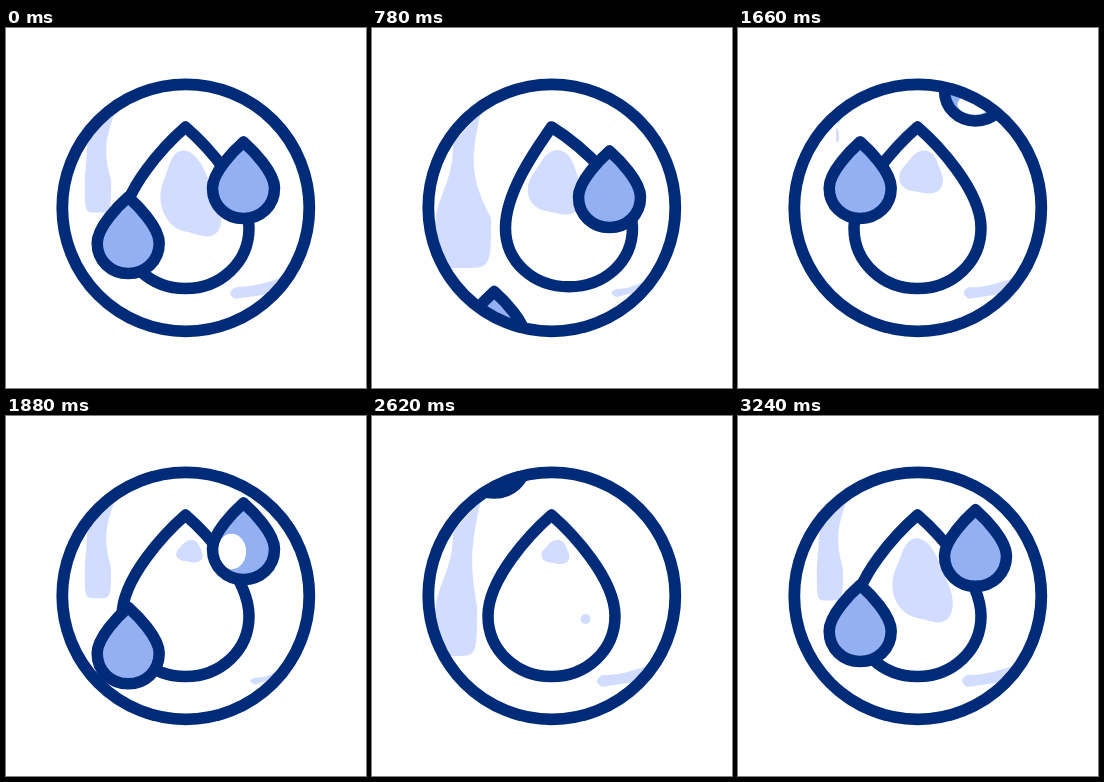
Write an HTML page that moves like this. It is 360x360 px and loops after 3.26 s.

```html
<!DOCTYPE html>
<html lang="en">
<head>
<meta charset="utf-8">
<title>Falling drops</title>
<style>
  html, body { margin: 0; width: 100%; height: 100%; overflow: hidden; background: #fff; }
  svg { display: block; width: 100%; height: 100%; }
  .line { fill: none; stroke: #002b79; stroke-width: 11.5; stroke-linejoin: round; }
  .tint { fill: #d1dcfe; }
  .water { fill: #93b1f2; }
</style>
</head>
<body>
<svg viewBox="0 0 360 360">
  <defs>
    <path id="drop" d="M0 6C-9 14-31 36-31 52C-31 70-17 82.5 0 82.5S31 70 31 52C31 36 9 14 0 6Z"/>
    <clipPath id="inside"><circle cx="179.8" cy="179.8" r="124"/></clipPath>
    <clipPath id="dropShape"><use href="#drop"/></clipPath>
  </defs>
  <g clip-path="url(#inside)">
    <path id="stream" class="tint"/>
    <path id="puddle" class="tint"/>
    <path id="core" class="tint"/>
    <circle id="dot" class="tint" cx="213.5" cy="203"/>
    <path id="bigDrop" class="line"/>
    <g id="leftDrop">
      <use href="#drop" class="water"/>
      <use href="#drop" class="line"/>
    </g>
    <g id="rightDrop">
      <use href="#drop" class="water"/>
      <g clip-path="url(#dropShape)"><ellipse id="glint" fill="#fff"/></g>
      <use href="#drop" class="line"/>
    </g>
  </g>
  <circle class="line" cx="179.8" cy="179.8" r="123.5" style="stroke-width: 11.8"/>
</svg>
<script>
const LOOP = 3260, HOLD = 260, STEP = 20;
const clamp01 = x => Math.min(1, Math.max(0, x));
const mix = (a, b, k) => a + (b - a) * k;
const easeOut = x => 1 - (1 - x) ** 3;
const bump = (t, center, width) => Math.exp(-(((t - center) / width) ** 2));

function set(id, attributes) {
  const node = document.getElementById(id);
  for (const name in attributes) node.setAttribute(name, attributes[name]);
}

// Value at time t along [time, value] keys
function track(t, keys, ease = x => x) {
  const next = Math.max(1, keys.findIndex(([time]) => time >= t));
  const [[t0, v0], [t1, v1]] = [keys[next - 1], keys[next]];
  return mix(v0, v1, ease(clamp01((t - t0) / (t1 - t0))));
}

const reachKeys = [[0, .56], [520, 1], [1020, 1], [1400, 0], [2360, 1], [3000, .56]];
const coreKeys = [[0, 1], [520, .75], [1020, .3], [1400, .5], [1860, 0], [2360, .28], [3000, 1]];

// Tint running down the left wall
function stream(reach, bulge) {
  const top = 84, low = 114 + 126 * reach, h = low - top;
  const open = clamp01(reach * 4);
  const left = mix(98, 79, open) - 16 * reach ** 8;
  const right = mix(101, 105, open) + 14 * bulge;
  return `M109 ${top}C98 ${top + .3 * h} 98 ${top + .42 * h} ${right} ${top + .68 * h}` +
    `C${right} ${low} ${right} ${low} ${(left + right) / 2} ${low}` +
    `C${left} ${low} ${left} ${low} ${left} ${low - .26 * h}` +
    `C${left} ${low - .45 * h} ${mix(99, 82, open)} ${top + .45 * h} ${mix(104, 81, open)} ${top + .2 * h}Z`;
}

// Tapering tint on the lower right wall
function puddle(size) {
  const left = 275 - 52 * size, h = 12 * size;
  return `M${left + 5} ${265 - .5 * h}C${left + 24} ${265 - .5 * h} 264 254 288 ${257 - h}` +
    `L270 ${257 + .7 * h}L${left + 5} ${265 + .5 * h}Q${left - 5} 265 ${left + 5} ${265 - .5 * h}Z`;
}

// Three-lobed blob that grows downwards and leans as it swells
function core(size) {
  const rx = 28 * (1 - (1 - size) ** 2), ry = 42 * size;
  const cy = 128 + 41 * size ** 1.2, lean = .2 * size ** 6;
  const outline = Array.from({ length: 48 }, (_, i) => {
    const a = i * Math.PI / 24, r = 1 - .12 * Math.cos(3 * (a + .35));
    const y = r * ry * Math.sin(a);
    return [184 + r * rx * Math.cos(a) + lean * y, cy + y];
  });
  return `M${outline.join('L')}Z`;
}

function bigDrop(sway) {
  const x = (v, share = 1) => v + sway * share;
  const bottom = 260.5 - .1 * sway;
  return `M179.5 99C${x(160, .45)} 116 ${x(116)} 162 ${x(116)} 200` +
    `C${x(116)} 234 ${x(144)} ${bottom} ${x(179.5)} ${bottom}` +
    `S${x(243)} 234 ${x(243)} 200C${x(243)} 162 ${x(199, .45)} 116 179.5 99Z`;
}

// Top of a small drop: falls out, passes through once, then settles again
function dropY(t, { rest, delay, start, gain }) {
  const local = t - delay, top = -60;
  if (local < 820) return rest + gain * Math.max(0, (t - start) / 520) ** 2.2;
  if (local < 2280) {
    const s = local - 1020;
    return -14 + 0.301 * s + 5.2e-5 * s * s;
  }
  const left = 1 - clamp01((local - 2280) / 612);
  return rest + (top - rest) * left * left;
}

const leftMove = { rest: 163, delay: 0, start: 0, gain: 94.5 };
const rightMove = { rest: 108, delay: 300, start: 340, gain: 93 };

function draw(t) {
  set('stream', { d: stream(track(t, reachKeys, easeOut), bump(t, 520, 250)) });
  set('puddle', { d: puddle(.98 - .3 * bump(t, 520, 250) - .98 * bump(t, 1860, 250)) });
  set('core', { d: core(track(t, coreKeys)) });
  set('dot', { r: 8 * bump(t, 1020, 150) + 5 * bump(t, 2360, 150) });

  const sway = t < 1020 ? 17.5 * Math.sin(Math.PI * t / 1020) ** 2 : 0;
  set('bigDrop', { d: bigDrop(sway) });
  set('leftDrop', { transform: `translate(122.2 ${dropY(t, leftMove)})` });
  set('rightDrop', { transform: `translate(237.5 ${dropY(t, rightMove)})` });

  const slide = clamp01((t - 1400) / 460);
  set('glint', {
    cx: mix(-1, -24, slide), cy: mix(66, 42, slide),
    rx: mix(17, 12, slide), ry: mix(10, 26, slide),
    visibility: t > 1120 && t < 2500 ? 'visible' : 'hidden'
  });
}

const begin = performance.now();
function tick() {
  const now = (performance.now() - begin) % LOOP;
  draw(Math.max(0, Math.floor(now / STEP) * STEP - HOLD));
  requestAnimationFrame(tick);
}
tick();
</script>
</body>
</html>
```
